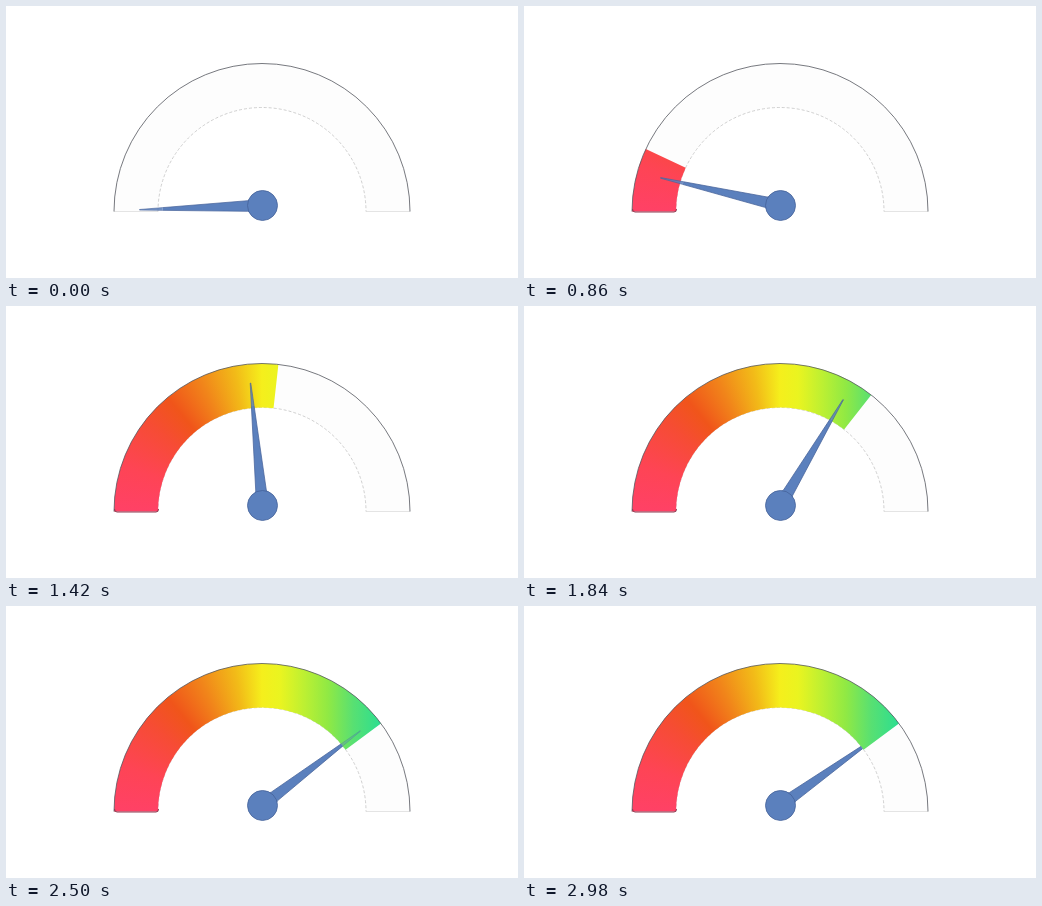
An HTML page with a canvas for the animation above (3000 ms loop, 512 by 272 pixels).

```html
<!DOCTYPE html>
<html lang="en">
<head>
<meta charset="utf-8">
<title>Gauge</title>
<style>
html, body { margin: 0; width: 100%; height: 100%; overflow: hidden; background: #fff; }
canvas { display: block; }
</style>
</head>
<body>
<canvas id="stage" width="512" height="272"></canvas>
<script>
const ctx = document.getElementById('stage').getContext('2d');
const LOOP = 3000, CX = 256, CY = 205.5, OUTER = 148, INNER = 104;
const HUB = { x: 256.5, y: 199.5, r: 15 };
const rad = deg => deg * Math.PI / 180;
const clamp = v => Math.min(1, Math.max(0, v));

// Cubic ease with horizontal handles at x = a and x = b
function ease(x, a, b) {
  x = clamp(x);
  let lo = 0, hi = 1;
  for (let i = 0; i < 24; i++) {
    const m = (lo + hi) / 2, n = 1 - m;
    if (3 * n * n * m * a + 3 * n * m * m * b + m ** 3 < x) lo = m; else hi = m;
  }
  return lo * lo * (3 - 2 * lo);
}

const fillAngle = t => 143.5 * ease((t - 500) / 2000, 0.245, 0.365);
const needleAngle = t => -2 + 146.5 * ease((t - 500) / 2300, 0.318, 0.293);

function addStops(gradient, stops) {
  for (const [at, color] of stops) gradient.addColorStop(at, color);
  return gradient;
}

const warm = addStops(ctx.createConicGradient(Math.PI, CX, CY), [
  [0, '#ff4166'], [0.05, '#fe4455'], [0.105, '#f64c34'], [0.14, '#f0551a'],
  [0.18, '#f1841a'], [0.22, '#f2bb18'], [0.25, '#f5ef1c'], [1, '#f5ef1c']
]);
const cool = addStops(ctx.createLinearGradient(256, 0, 376, 0), [
  [0, '#f5ef1c'], [0.15, '#eaf420'], [0.35, '#bdf032'],
  [0.55, '#90e944'], [0.76, '#58e072'], [1, '#2ade92']
]);

function bandPath(from, to) {
  const a = Math.PI + rad(from), b = Math.PI + rad(to);
  ctx.beginPath();
  ctx.arc(CX, CY, OUTER, a, b);
  ctx.arc(CX, CY, INNER, b, a, true);
  ctx.closePath();
}

function paintBand(from, to, style) {
  bandPath(from, to);
  ctx.fillStyle = style;
  ctx.fill();
}

function strokeArc(r, color, dash = []) {
  ctx.beginPath();
  ctx.arc(CX, CY, r, Math.PI, 2 * Math.PI);
  ctx.setLineDash(dash);
  ctx.strokeStyle = color;
  ctx.stroke();
  ctx.setLineDash([]);
}

function line(x1, y1, x2, y2, color) {
  ctx.beginPath();
  ctx.moveTo(x1, y1);
  ctx.lineTo(x2, y2);
  ctx.strokeStyle = color;
  ctx.stroke();
}

function drawBand(angle) {
  ctx.lineWidth = 0.8;
  paintBand(0, 180, '#fdfdfd');
  line(108, 205.5, 152, 205.5, '#ddd');
  line(360, 205.5, 404, 205.5, '#ddd');
  strokeArc(INNER, '#c4c4c4', [3, 2]);
  if (angle > 0.05) {
    paintBand(0, Math.min(angle, 90), warm);
    if (angle > 90) paintBand(89.8, angle, cool);
    ctx.lineWidth = 1;
    ctx.beginPath();
    ctx.moveTo(108.5, 203);
    ctx.quadraticCurveTo(108.5, 206, 111, 206);
    ctx.lineTo(150, 206);
    ctx.quadraticCurveTo(152.5, 206, 152.5, 203);
    ctx.strokeStyle = '#8d3a50';
    ctx.stroke();
  }
  ctx.lineWidth = 0.8;
  strokeArc(OUTER, '#55575f');
}

function needleShape() {
  ctx.beginPath();
  ctx.moveTo(8, -8);
  ctx.lineTo(15, -5.3);
  ctx.lineTo(123, -0.3);
  ctx.lineTo(123, 0.3);
  ctx.lineTo(15, 5.3);
  ctx.lineTo(8, 8);
  ctx.closePath();
  ctx.fillStyle = '#5b80bd';
  ctx.fill();
  ctx.lineWidth = 0.7;
  ctx.strokeStyle = '#46629a';
  ctx.stroke();
}

function drawNeedle(angle, tipAlpha) {
  ctx.save();
  ctx.translate(HUB.x, HUB.y);
  ctx.rotate(Math.PI + rad(angle));
  for (const [from, to, alpha] of [[0, 100, 1], [100, 126, tipAlpha]]) {
    ctx.save();
    ctx.beginPath();
    ctx.rect(from, -20, to - from, 40);
    ctx.clip();
    ctx.globalAlpha = alpha;
    needleShape();
    ctx.restore();
  }
  ctx.restore();
  ctx.beginPath();
  ctx.arc(HUB.x, HUB.y, HUB.r, 0, 2 * Math.PI);
  ctx.fillStyle = '#5b80bd';
  ctx.fill();
  ctx.lineWidth = 0.8;
  ctx.strokeStyle = '#46629a';
  ctx.stroke();
}

function draw(now) {
  const t = now % LOOP;
  ctx.fillStyle = '#fff';
  ctx.fillRect(0, 0, 512, 272);
  drawBand(fillAngle(t));
  drawNeedle(needleAngle(t), 0.85 * clamp((2750 - t) / 600));
  requestAnimationFrame(draw);
}
requestAnimationFrame(draw);
</script>
</body>
</html>
```
